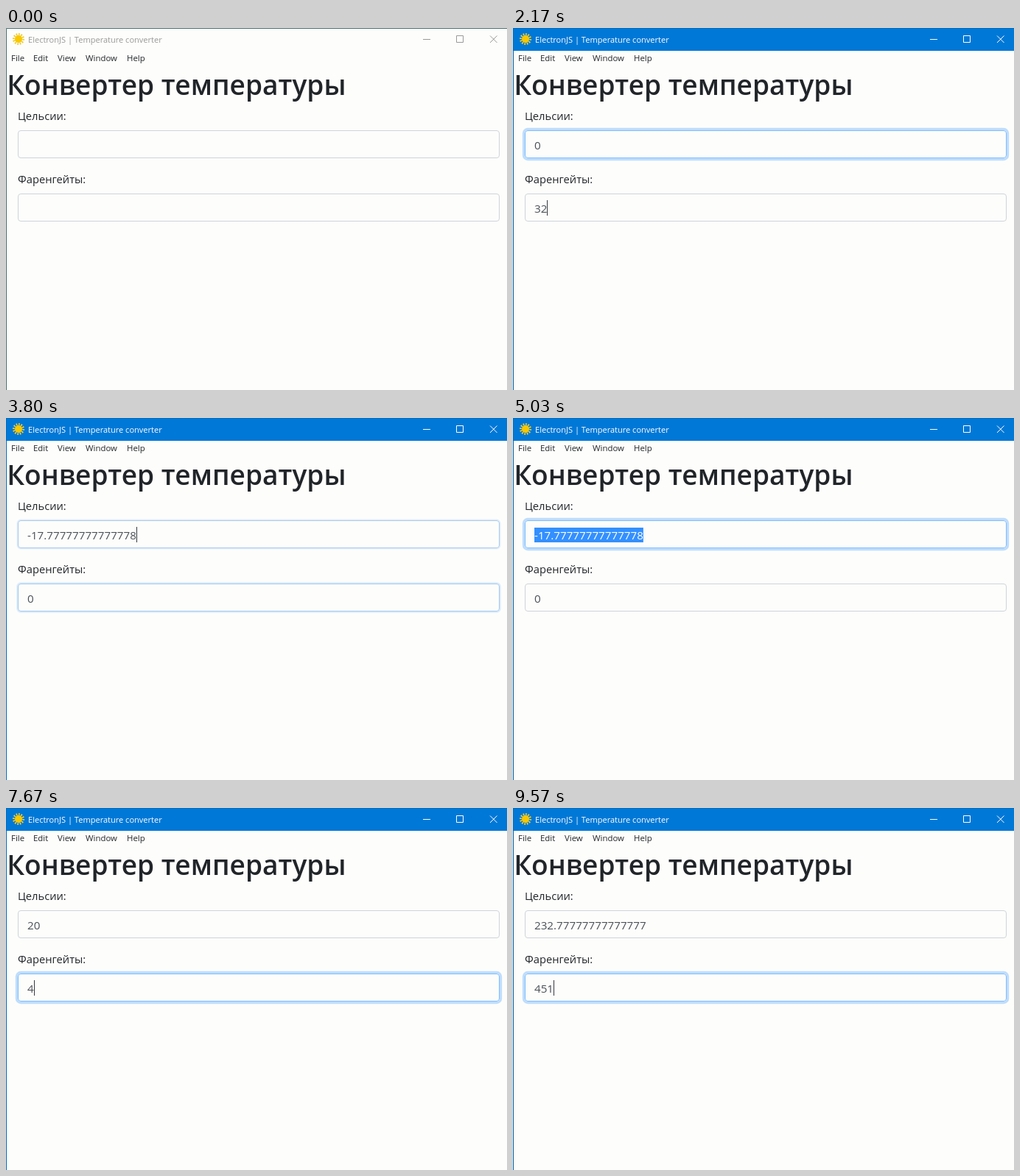
Recreate the animation shown at these times as an HTML page. Size 680 px wide and 492 px high, loop 9760 ms.

```html
<!DOCTYPE html>
<html lang="ru">
<head>
<meta charset="utf-8">
<title>Temperature converter</title>
<style>
html, body { margin: 0; height: 100%; overflow: hidden; background: #fdfdfb; }
svg { display: block; width: 100%; height: 100%; }
text { font-family: "Open Sans", "Noto Sans", sans-serif; fill: #212529; white-space: pre; }
.menu { font-size: 11.4px; }
.label { font-size: 14.7px; }
.value { font-size: 15.2px; fill: #495057; }
.head { font-size: 37.1px; font-weight: 600; }
</style>
</head>
<body>
<svg viewBox="0 0 680 492">
  <rect id="bar" width="680" height="31" fill="#0078d7"/>
  <rect id="hover" x="548" y="1" width="46" height="29" fill="#fff"/>
  <path id="frame" d="M680 .5H.5V492" fill="none"/>
  <circle cx="17" cy="15" r="6.3" fill="none" stroke="#f2cb2c" stroke-width="3.4" pathLength="24" stroke-dasharray="1"/>
  <circle cx="17" cy="15" r="5" fill="#f8c800"/>
  <text id="title" x="30" y="20" font-size="11.05">ElectronJS | Temperature converter</text>
  <path id="buttons" d="M566 15.5h10M611.5 10.5h9v9h-9zM657 10.5l9.5 9.5M666.5 10.5L657 20" fill="none"/>
  <g class="menu">
    <text x="7" y="45">File</text>
    <text x="37" y="45">Edit</text>
    <text x="70" y="45">View</text>
    <text x="108" y="45">Window</text>
    <text x="164" y="45">Help</text>
  </g>
  <text class="head" x="1.2" y="90.5">Конвертер температуры</text>
  <g id="fields"></g>
  <rect id="caret" width="1" height="21" fill="#343a40"/>
</svg>
<script>
const LOOP = 9760;
const $ = id => document.getElementById(id);
const set = (el, attrs) => { for (const k in attrs) el.setAttribute(k, attrs[k]); };
const clamp = v => Math.min(1, Math.max(0, v));
const ease = v => (1 - Math.cos(Math.PI * clamp(v))) / 2;
const mix = (a, b, p) => `rgb(${a.map((v, i) => Math.round(v + (b[i] - v) * p))})`;
const within = (spans, t) => spans.some(([a, b]) => t >= a && t < b);

const FADE = 150;
const fields = [
  {
    label: "Цельсии:", y: 139, focus: [[270, 2170], [3730, 6370]],
    typed: [[0, ""], [1230, "0"], [2930, "-17.77777777777778"], [5230, "2"], [5370, "20"],
      [7800, "-15.555555555555555"], [8030, "7.222222222222222"], [8530, "232.77777777777777"]]
  },
  {
    label: "Фаренгейты:", y: 225, focus: [[2170, 3730], [6370, LOOP + FADE]],
    typed: [[0, ""], [1370, "32"], [2800, "0"], [5340, "35.6"], [5530, "68"],
      [7670, "4"], [7900, "45"], [8370, "451"]]
  }
];
const caretOn = [[230, 730], [1230, 1730], [2170, 2300], [2800, 3300], [3730, 3870],
  [5230, 5900], [6370, 6530], [7670, 8900], [9370, LOOP]];
const selected = [[2300, 2800], [3870, 5230], [6530, 7670]];
const inSecond = [[2170, 3730], [6370, LOOP]];

function add(tag, attrs, text = "") {
  const el = document.createElementNS("http://www.w3.org/2000/svg", tag);
  set(el, attrs);
  el.textContent = text;
  return $("fields").appendChild(el);
}

for (const f of fields) {
  add("text", { class: "label", x: 16, y: f.y - 14 }, f.label);
  f.ring = add("rect", { fill: "none", stroke: "#007bff" });
  f.box = add("rect", { x: 16.5, y: f.y + .5, width: 653, height: 37, rx: 3.5, fill: "#fdfdfb" });
  f.mark = add("rect", { x: 29, y: f.y + 10, height: 20, fill: "#3390ff" });
  f.value = add("text", { class: "value", x: 29, y: f.y + 26 });
}

function drawField(f, t, active) {
  const p = f.focus.reduce((sum, [a, b]) => sum + ease((t - a) / FADE) - ease((t - b) / FADE), 0);
  const s = 3.2 * p;
  set(f.ring, {
    x: 16 - s / 2, y: f.y - s / 2, width: 654 + s, height: 38 + s, rx: 4 + s / 2,
    "stroke-width": s, "stroke-opacity": .25 * p
  });
  set(f.box, { stroke: mix([206, 212, 218], [128, 189, 255], p) });

  const text = f.typed.filter(e => e[0] <= t).pop()[1];
  if (f.value.textContent !== text) f.value.textContent = text;
  const width = text ? f.value.getComputedTextLength() : 0;
  const marked = active && within(selected, t);
  set(f.mark, { width: marked ? width : 0 });
  f.value.style.fill = marked ? "#fff" : "";
  if (active) set($("caret"), {
    x: Math.round(29 + width), y: f.y + 9, opacity: within(caretOn, t) ? 1 : 0
  });
}

function draw(now) {
  const t = now % LOOP;
  const p = clamp((t - 230) / 100);
  const ink = mix([153, 153, 153], [255, 255, 255], p);
  set($("bar"), { opacity: p });
  set($("frame"), { stroke: mix([72, 110, 110], [0, 110, 190], p) });
  set($("buttons"), { stroke: ink });
  $("title").style.fill = ink;
  set($("hover"), { opacity: t < 9370 ? 0 : .1 * clamp((9560 - t) / 190) });
  const current = within(inSecond, t) ? 1 : 0;
  fields.forEach((f, i) => drawField(f, t, i === current));
  requestAnimationFrame(() => draw(performance.now() - start));
}

const start = performance.now();
draw(0);
</script>
</body>
</html>
```
